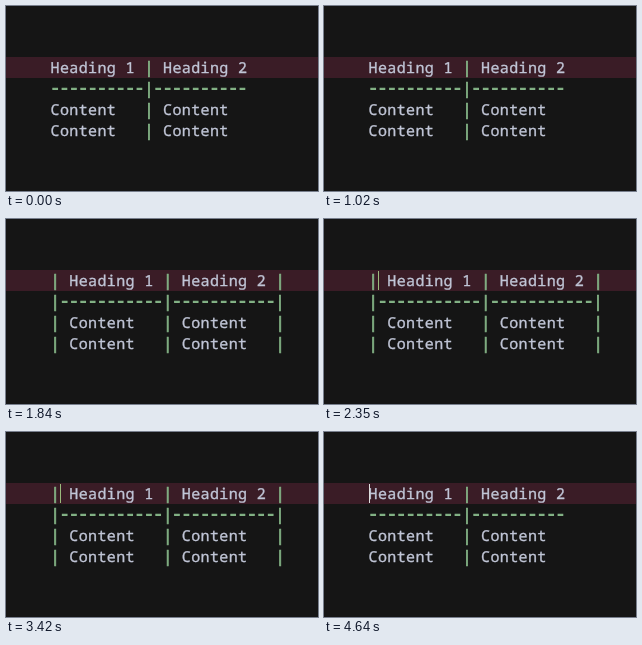
An HTML page for the animation above (5150 ms loop, 312 by 185 pixels).

```html
<!DOCTYPE html>
<html lang="en">
<head>
<meta charset="utf-8">
<title>Table formatting</title>
<style>
  html, body { margin: 0; width: 100%; height: 100%; overflow: hidden; background: #151515; }
  svg { display: block; }
  text {
    font: 15px "Noto Sans Mono", "DejaVu Sans Mono", monospace;
    letter-spacing: .375px;
    white-space: pre;
    text-rendering: geometricPrecision;
    fill: #c0c5d6;
    stroke: #c0c5d6;
    stroke-width: .35px;
  }
  .bar, .dash {
    font-size: 15.625px;
    letter-spacing: 0;
    fill: #84b486;
    stroke: #84b486;
    stroke-width: .75px;
  }
  .dash { baseline-shift: .8px; stroke-width: 1px; }
</style>
</head>
<body>
<svg width="312" height="185" viewBox="0 0 312 185">
  <rect width="312" height="185" fill="#151515"/>
  <rect y="51" width="312" height="21" fill="#3a1c26"/>
  <g id="plain"></g>
  <g id="piped"></g>
  <rect id="caret" y="52" width="1" height="19"/>
</svg>
<script>
const LOOP = 5150;
const $ = id => document.getElementById(id);

const tables = {
  plain: [
    'Heading 1 | Heading 2',
    '----------|----------',
    'Content   | Content',
    'Content   | Content'
  ],
  piped: [
    '| Heading 1 | Heading 2 |',
    '|-----------|-----------|',
    '| Content   | Content   |',
    '| Content   | Content   |'
  ]
};

// Start time, table, caret column (-1 = hidden)
const steps = [
  [0, 'plain', -1],
  [460, 'plain', 0],
  [1020, 'plain', -1],
  [1530, 'piped', 2],
  [1840, 'piped', -1],
  [2350, 'piped', 1],
  [2860, 'piped', -1],
  [3420, 'piped', 1],
  [3930, 'plain', 0],
  [4080, 'plain', -1],
  [4640, 'plain', 0]
];

const mark = run => `<tspan class="${run === '|' ? 'bar' : 'dash'}">${run}</tspan>`;

for (const [id, rows] of Object.entries(tables)) {
  $(id).innerHTML = rows.map((row, i) =>
    `<text x="44.5" y="${67 + 21 * i}">${row.replace(/-+|\|/g, mark)}</text>`
  ).join('');
}

function draw(now) {
  const t = now % LOOP;
  const [, table, col] = steps.findLast(step => step[0] <= t);
  for (const id in tables) $(id).style.display = id === table ? '' : 'none';
  const caret = $('caret');
  caret.style.display = col < 0 ? 'none' : '';
  caret.setAttribute('x', 45 + 9 * Math.max(col, 0));
  caret.setAttribute('fill', col === 1 ? '#9aba7c' : '#dedede');
}

const start = performance.now();
function tick() {
  draw(performance.now() - start);
  requestAnimationFrame(tick);
}
tick();
</script>
</body>
</html>
```
